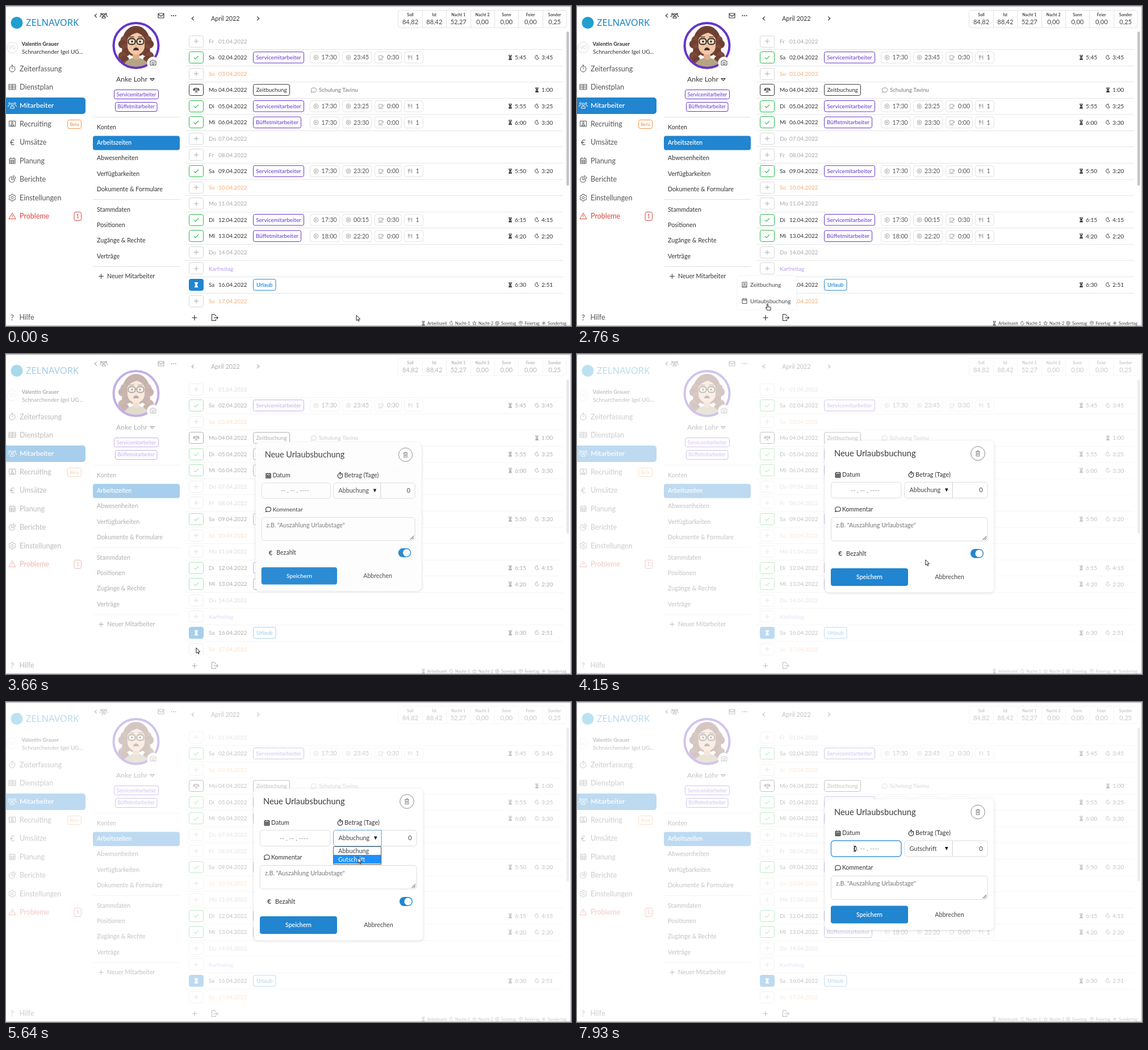
Recreate the animation shown at these times as an HTML page with a canvas. Size 995 px wide and 563 px high, loop 8000 ms.

```html
<!DOCTYPE html>
<html lang="de">
<head>
<meta charset="utf-8">
<title>Urlaubsbuchung</title>
<style>
html, body { margin: 0; width: 100%; height: 100%; overflow: hidden; background: #fff; }
canvas { display: block; }
</style>
</head>
<body>
<canvas id="stage" width="995" height="563"></canvas>
<script>
const W = 995, H = 563, LOOP = 8000;
const stage = document.getElementById('stage').getContext('2d');
const page = document.createElement('canvas');
page.width = W;
page.height = H;
let g = page.getContext('2d');

const BLUE = '#2185d0', PURPLE = '#6435c9', GREEN = '#21ba45', INK = '#333', GREY = '#b4b4b4';

const ICONS = {
  watch: 'M-5 1a5 5 0 1 0 10 0a5 5 0 1 0-10 0M-1.5-6h3M0-6v2M0 1v-3M4-4l1 1',
  table: 'M-6-4.5h12v9h-12zM-6-1.5h12M-6 1.5h12M0-4.5v9',
  users: 'M-2-2a2 2 0 1 0 4 0a2 2 0 1 0-4 0M-3.5 5v-1.5q0-2 2-2h3q2 0 2 2v1.5zM-6.3-3.5a1.5 1.5 0 1 0 3 0a1.5 1.5 0 1 0-3 0M3.3-3.5a1.5 1.5 0 1 0 3 0a1.5 1.5 0 1 0-3 0M-7.5 2.5v-1q0-1.5 1.5-1.5h1.5M7.5 2.5v-1q0-1.5-1.5-1.5h-1.5',
  person: 'M-5.5-5h11v9.5h-11zM-1.5-2a1.5 1.5 0 1 0 3 0a1.5 1.5 0 1 0-3 0M-3 3q0-2.5 3-2.5t3 2.5z',
  calendar: 'M-5-4h10v9h-10zM-5-1h10M-5 2h10M-1.7-1v6M1.7-1v6M-2.5-6v2M2.5-6v2',
  pie: 'M-1-4.5a5 5 0 1 0 5.5 5.5h-5.5zM1.5-6v4.5h4.5a4.5 4.5 0 0 0-4.5-4.5z',
  gear: 'M0-2a2 2 0 1 0 .01 0zM-1.3-6h2.6l.5 1.7 1.2.7 1.8-.5 1.2 2.1-1.2 1.3v1.4l1.2 1.3-1.2 2.1-1.8-.5-1.2.7-.5 1.7h-2.6l-.5-1.7-1.2-.7-1.8.5-1.2-2.1 1.2-1.3v-1.4l-1.2-1.3 1.2-2.1 1.8.5 1.2-.7z',
  warn: 'M0-5.5l6 10.5h-12zM0-2v3.5M0 3v.6',
  mail: 'M-5-4h10v8h-10zM-5-2.5l5 3.5 5-3.5',
  camera: 'M-5-3h2.2l1-1.6h3.6l1 1.6h2.2v7h-10zM-2 .5a2 2 0 1 0 4 0a2 2 0 1 0-4 0',
  glass: 'M-3.5-4.5h7M-3.5 4.5h7M-2.5-4.5q0 3 1.8 4.5q-1.8 1.5-1.8 4.5h5q0-3-1.8-4.5q1.8-1.5 1.8-4.5M-1.8 3.2q1.8-2 3.6 0zM-1.6-2h3.2l-1.6 1.6z',
  moon: 'M1.5-4.5a4.2 4.2 0 1 0 3 6.2a4.5 4.5 0 0 1-3-6.2z',
  play: 'M-4.2 0a4.2 4.2 0 1 0 8.4 0a4.2 4.2 0 1 0-8.4 0M-1.2-1.8l3 1.8-3 1.8z',
  stop: 'M-4.2 0a4.2 4.2 0 1 0 8.4 0a4.2 4.2 0 1 0-8.4 0M-1.4-1.4h2.8v2.8h-2.8z',
  cup: 'M-3.5-3.5h6v4.5q0 1.5-1.5 1.5h-3q-1.5 0-1.5-1.5zM2.5-2.5h1q1.5 0 1.5 1.5t-1.5 1.5h-1M-5 4.5h9',
  fork: 'M-3.5-4v3q0 1.3 1.3 1.3t1.3-1.3v-3M-2.2-4v8.5M3.5 4.5v-8.5q-2.2 1-2.2 4.5h2.2',
  comment: 'M-4.5 0q0-3.8 4.5-3.8t4.5 3.8-4.5 3.8q-1 0-2-.4l-2.5 1 .8-2q-.8-1-.8-2.4z',
  scale: 'M0-4.5v8.5M-3 4h6M-4-3h8M-4-3l-1.8 3.5h3.6zM4-3l-1.8 3.5h3.6z',
  check: 'M-4.5 0l3 3 6-6',
  plus: 'M-4.5 0h9M0-4.5v9',
  left: 'M2-3.8l-4 3.8 4 3.8',
  right: 'M-2-3.8l4 3.8-4 3.8',
  caret: 'M-3.8-2h7.6l-3.8 4z',
  leave: 'M2.5-2.5v-1l-2.3-2.5h-4.7v11h7v-2.5M-1 0h7M4-2.2l2.2 2.2-2.2 2.2',
  star: 'M0-4.5l1.3 3 3.2.3-2.4 2.1.8 3.2-2.9-1.7-2.9 1.7.8-3.2-2.4-2.1 3.2-.3z',
  sun: 'M-4.4 0a4.4 4.4 0 1 0 8.8 0a4.4 4.4 0 1 0-8.8 0M-2 0a2 2 0 1 0 4 0a2 2 0 1 0-4 0',
  pin: 'M0 4.6q-4.2-3.5-4.2-5.4a4.2 3.8 0 0 1 8.4 0q0 1.9-4.2 5.4zM-1.5-1a1.5 1.5 0 1 0 3 0a1.5 1.5 0 1 0-3 0',
  burst: 'M0-4.5v9M-4-2.3l8 4.6M-4 2.3l8-4.6',
  trash: 'M-4-3.5h8M-1.5-3.5v-1.3h3v1.3M-3-3.5v8.5h6v-8.5M-1-1.5v4.5M1-1.5v4.5',
  book: 'M-4-4.5h8v9h-8zM-4 2.5h8M-2-2h4M-2 0h4',
  day: 'M-4-3.5h8v8h-8zM-4-1.5h8M-2-5v1.5M2-5v1.5',
  grip: 'M-3.5 3.5l7-7M0 3.5l3.5-3.5',
  arrow: 'M0 0v9.5l2.2-2 1.5 3.2 1.5-.7-1.5-3.1h3z',
  hand: 'M0 .8q0-.8.9-.8t.9.8v4l4 .9q1 .3.9 1.3l-.6 4h-5.6l-3-4.4q.6-1 1.6-.2l.9.8z',
  beam: 'M-2.2-4.8q2.2 0 2.2 1q0-1 2.2-1M0-3.8v7.6M-2.2 4.8q2.2 0 2.2-1q0 1 2.2 1'
};
for (const k in ICONS) ICONS[k] = new Path2D(ICONS[k]);

function icon(name, x, y, color = INK, size = 1, line = 0.9, fill) {
  g.save();
  g.translate(x, y);
  g.scale(size, size);
  g.lineWidth = line / size;
  g.lineJoin = 'round';
  if (fill) { g.fillStyle = fill; g.fill(ICONS[name]); }
  g.strokeStyle = color;
  g.stroke(ICONS[name]);
  g.restore();
}

// y is the middle of the capital letters
function text(s, x, y, size, color = INK, align = 'left', weight = 400, family = 'Lato') {
  g.font = `${weight} ${size}px ${family}, sans-serif`;
  g.textAlign = align;
  g.fillStyle = color;
  g.fillText(s, x, y + size * 0.36);
}

function box(x, y, w, h, r, stroke, fill, line = 1) {
  g.beginPath();
  g.roundRect(x, y, w, h, r);
  if (fill) { g.fillStyle = fill; g.fill(); }
  if (stroke) { g.strokeStyle = stroke; g.lineWidth = line; g.stroke(); }
}

function disc(x, y, r, fill, stroke, line = 1) {
  g.beginPath();
  g.arc(x, y, r, 0, 7);
  if (fill) { g.fillStyle = fill; g.fill(); }
  if (stroke) { g.strokeStyle = stroke; g.lineWidth = line; g.stroke(); }
}

function rule(x, y, w, h, color) {
  g.fillStyle = color;
  g.fillRect(x, y, w, h);
}

function sidebar() {
  disc(19, 29.5, 10.5, '#1f9fd0');
  text('ZELNAVORK', 35, 29.5, 16.6, '#1a86c0', 'left', 500, '"Noto Sans"');
  disc(11, 73, 9.5, '#fff', '#ddd');
  text('VG', 11, 73, 8.5, '#d5d5d5', 'center');
  text('Valentin Grauer', 27.5, 67, 9.4, INK, 'left', 700);
  text('Schnarchender Igel UG...', 28, 80, 10);
  const items = [['Zeiterfassung', 'watch'], ['Dienstplan', 'table'], ['Mitarbeiter', 'users'],
    ['Recruiting', 'person'], ['Umsätze'], ['Planung', 'calendar'], ['Berichte', 'pie'],
    ['Einstellungen', 'gear'], ['Probleme', 'warn']];
  box(-6, 161, 146, 29, 5, null, BLUE);
  items.forEach(([label, pic], i) => {
    const y = 110 + i * 32.45, on = i === 2;
    const color = on ? '#fff' : i === 8 ? '#d9453d' : '#555';
    if (pic) icon(pic, 11, y, color, 1, 1);
    else text('€', 11, y, 14, color, 'center');
    text(label, 24, y, on ? 12 : 12.5, color, 'left', on ? 600 : 400);
  });
  box(108.5, 200.5, 24, 15, 3, '#f2914a');
  text('Beta', 120.5, 208, 8, '#f2813a', 'center');
  box(120, 362.5, 12.5, 15, 3, '#d9453d');
  text('1', 126.2, 370, 9.5, '#d9453d', 'center');
  text('?', 11, 548, 14, '#555', 'center');
  text('Hilfe', 23.5, 548, 12.4, '#555');
}

function portrait() {
  const x = 229, hair = '#6f4032';
  g.save();
  disc(x, 69.5, 38.5, '#fff');
  g.clip();
  g.beginPath();
  g.ellipse(x, 62, 24, 27, 0, 0, 7);
  g.fillStyle = hair;
  g.fill();
  for (let i = 0; i < 7; i++) for (const s of [-1, 1])
    disc(x + s * (20 + 4 * Math.sin(i * 1.9)), 60 + i * 7, 7.5, i % 2 ? hair : '#7b4a39');
  g.beginPath();
  g.ellipse(x, 112, 24, 21, 0, 0, 7);
  g.fillStyle = '#b5a582';
  g.fill();
  box(x - 6, 80, 12, 15, 6, null, '#dfae8b');
  box(x - 15, 45, 30, 41, 15, null, '#f0c8a6');
  g.beginPath();
  g.moveTo(x - 17, 63);
  g.quadraticCurveTo(x - 13, 50, x + 2, 47);
  g.quadraticCurveTo(x + 14, 51, x + 17, 63);
  g.quadraticCurveTo(x + 20, 38, x, 37);
  g.quadraticCurveTo(x - 20, 38, x - 17, 63);
  g.fillStyle = hair;
  g.fill();
  for (const s of [-1, 1]) {
    box(x + s * 7.5 - 6, 57.5, 12, 10, 4, '#2b2422', '#f6dcc6', 1.8);
    disc(x + s * 7, 62.5, 1.7, '#2b2422');
    rule(x + s * 7.5 - 4, 53.8, 8, 1.4, '#4c2d24');
  }
  rule(x - 2, 61, 4, 1.5, '#2b2422');
  rule(x - 2, 70, 4, 1, '#cf9a78');
  g.beginPath();
  g.arc(x, 78, 5, Math.PI, 0);
  g.fillStyle = '#51282a';
  g.fill();
  g.restore();
  disc(x, 69.5, 39.5, null, PURPLE, 4);
  disc(259, 100, 10.5, '#fff', '#eee', 0.8);
  icon('camera', 259, 100, INK);
}

function staffPanel() {
  icon('left', 158, 17, INK, 0.9, 1.1);
  icon('users', 172, 17, INK, 0.85, 1.2);
  icon('mail', 273, 17, INK, 1, 1.1);
  for (let i = 0; i < 3; i++) disc(291.5 + i * 3.6, 17, 1.1, INK);
  portrait();
  text('Anke Lohr', 194, 129, 12.3);
  icon('caret', 257.5, 129.5, INK, 0.95, 1.1);
  box(190.5, 147.5, 78, 16, 3, PURPLE);
  text('Servicemitarbeiter', 229.5, 155.5, 8.65, PURPLE, 'center');
  box(192.5, 169.5, 73.5, 16, 3, PURPLE);
  text('Büffetmitarbeiter', 229.3, 177.3, 8.65, PURPLE, 'center');
  for (const y of [195, 340, 458]) rule(153, y, 153, 1, '#dedede');
  box(153, 228.5, 153, 25, 4, null, BLUE);
  ['Konten', 'Arbeitszeiten', 'Abwesenheiten', 'Verfügbarkeiten', 'Dokumente & Formulare'].forEach((s, i) =>
    text(s, 160, 213 + i * 27.3, i === 1 ? 10.4 : 10.7, i === 1 ? '#fff' : INK, 'left', i === 1 ? 600 : 400));
  ['Stammdaten', 'Positionen', 'Zugänge & Rechte', 'Verträge'].forEach((s, i) =>
    text(s, 160, 358 + i * 27.3, 10.7));
  icon('plus', 167.5, 475.5, INK, 0.95, 1);
  text('Neuer Mitarbeiter', 178, 475.5, 10.6);
}

function summary() {
  icon('left', 329, 22, INK, 0.9, 1.2);
  text('April 2022', 361, 22, 10.9);
  icon('right', 444, 22, INK, 0.9, 1.2);
  box(690.5, 7.5, 296.5, 30.5, 4, '#e2e2e2');
  const cells = ['Soll 84,82', 'Ist 88,42', 'Nacht_1 52,27', 'Nacht_2 0,00', 'Sonn 0,00', 'Feier 0,00', 'Sonder 0,25'];
  cells.forEach((c, i) => {
    const [head, value] = c.split(' '), x = 712 + i * 42.35;
    text(head.replace('_', ' '), x, 15, 7.2, INK, 'center', 600);
    text(value, x, 28, 11, '#444', 'center');
    if (i) rule(Math.round(x - 21.5), 8, 1, 30, '#e2e2e2');
  });
}

// kind, day, date or label, start, end, break, hours, night
const ROWS = [
  'free Fr 01', 'S Sa 02 17:30 23:45 0:30 5:45 3:45', 'sun So 03', 'book Mo 04',
  'S Di 05 17:30 23:25 0:00 5:55 3:25', 'B Mi 06 17:30 23:30 0:00 6:00 3:30',
  'free Do 07', 'free Fr 08', 'S Sa 09 17:30 23:20 0:00 5:50 3:20', 'sun So 10', 'free Mo 11',
  'S Di 12 17:30 00:15 0:30 6:15 4:15', 'B Mi 13 18:00 22:20 0:00 4:20 2:20',
  'free Do 14', 'feast', 'leave Sa 16', 'sun So 17'];

function tag(s, y, w, color, weight = 400) {
  box(435.5, y - 9.8, w, 19.5, 3, color);
  text(s, 435.5 + w / 2, y, weight > 400 ? 9.6 : 9.9, color, 'center', weight);
}

function totals(y, hours, night) {
  icon('glass', 888, y, INK, 0.85, 1);
  text(hours, 896, y, 10.2);
  icon('moon', 934.5, y, INK, 0.85);
  text(night, 943, y, 10.2);
}

function dayRow(row, i) {
  const [kind, day, date, from, to, rest, hours, night] = row.split(' ');
  const y = 62 + i * 28.57, top = Math.round(y - 10.5) + 0.5;
  const work = kind === 'S' || kind === 'B';
  const color = { free: '#a8a8a8', sun: '#f7ac74', feast: '#b79df0' }[kind] || INK;
  if (i < 16) rule(316, Math.round(y + 14), 665, 1, '#e6e6e6');
  const edge = work ? GREEN : kind === 'book' ? INK : kind === 'leave' ? BLUE : '#d6d6d6';
  box(322.5, top, 25, 20, 3, edge, kind === 'leave' ? BLUE : null);
  const pic = work ? 'check' : { book: 'scale', leave: 'glass' }[kind] || 'plus';
  icon(pic, 335, y, work ? GREEN : kind === 'book' ? INK : kind === 'leave' ? '#fff' : GREY, 0.9, 1.1, kind === 'leave' && '#fff');
  if (kind === 'feast') return text('Karfreitag', 357, y, 9.9, color);
  text(day, 357, y, 9.9, color);
  text(date + '.04.2022', 374, y, 9.9, color);
  if (kind === 'book') {
    tag('Zeitbuchung', y, 64, INK);
    icon('comment', 542, y, '#888', 1);
    text('Schulung Tavinu', 551, y, 9.7, '#777');
    icon('glass', 935, y, INK, 0.85, 1);
    text('1:00', 943, y, 10.2);
  }
  if (kind === 'leave') {
    tag('Urlaub', y, 39.5, BLUE, 600);
    totals(y, '6:30', '2:51');
  }
  if (!work) return;
  if (kind === 'S') tag('Servicemitarbeiter', y, 89, PURPLE);
  else tag('Büffetmitarbeiter', y, 84, PURPLE);
  const chips = [[535.5, 51.5, 546, 'play', from, 555.5], [592.5, 51.5, 603, 'stop', to, 612],
    [649.5, 47, 660, 'cup', rest, 671], [701.5, 33, 711.5, 'fork', '1', 721.5]];
  for (const [x, w, ix, name, label, tx] of chips) {
    box(x, y - 9.7, w, 19.5, 4, '#e2e2e2');
    icon(name, ix, y, '#999', 0.95, 0.85);
    text(label, tx, y, 10.6, '#555');
  }
  totals(y, hours, night);
}

function footer() {
  icon('plus', 332, 548.5, INK, 1, 1.2);
  icon('leave', 367, 548.5, INK, 1, 1.1);
  const legend = [['glass', 735, 'Arbeitszeit'], ['moon', 784, 'Nacht-1'], ['star', 825, 'Nacht-2'],
    ['sun', 865, 'Sonntag'], ['pin', 906.5, 'Feiertag'], ['burst', 947, 'Sondertag']];
  for (const [name, x, label] of legend) {
    icon(name, x, 558, '#555', 0.75, 0.75);
    text(label, x + 7, 558, 7.35, '#444');
  }
}

function drawPage() {
  rule(0, 0, W, H, '#fff');
  sidebar();
  staffPanel();
  summary();
  ROWS.forEach(dayRow);
  box(987, 45, 4.5, 271, 2, null, '#c4c4c4');
  footer();
}

const clamp = v => Math.min(1, Math.max(0, v));
const ramp = (t, from, to) => clamp((t - from) / (to - from));
const EASE = {
  both: p => p * p * (3 - 2 * p),
  in: p => p * p,
  out: p => 1 - (1 - p) * (1 - p)
};

// time, x, y, easing of the way there
const PATH = [[650, 617, 544], [1440, 332, 552, 'both'], [2520, 333, 552, 'both'], [2860, 335, 517, 'both'],
  [3850, 335, 517, 'both'], [4100, 480, 381, 'in'], [4400, 910, 320, 'out'], [4690, 632, 246, 'both'],
  [5360, 632, 246, 'both'], [5640, 620, 274, 'both'], [6310, 620, 274, 'both'], [6690, 486, 269, 'both'],
  [7020, 486, 269, 'both'], [7080, 489, 258, 'both']];

function pointerAt(t) {
  let a = PATH[0];
  if (t <= a[0]) return [a[1], a[2]];
  for (const b of PATH) {
    if (t < b[0]) {
      const p = EASE[b[3]](ramp(t, a[0], b[0]));
      return [a[1] + (b[1] - a[1]) * p, a[2] + (b[2] - a[2]) * p];
    }
    a = b;
  }
  return [a[1], a[2]];
}

function pointer(t) {
  const [x, y] = pointerAt(t);
  if (t >= 6600) return icon('beam', x, y, '#111', 1, 1.1);
  const hand = (t >= 1490 && t < 3340) || (t >= 4600 && t < 4900);
  icon(hand ? 'hand' : 'arrow', x, y, '#111', 1, 0.9, '#fff');
}

function menu(t) {
  const a = ramp(t, 2100, 2360) * (1 - ramp(t, 3340, 3620));
  if (!a) return;
  const dy = 7 * (a - 1);
  g.save();
  g.globalAlpha = a;
  g.shadowColor = 'rgba(0,0,0,.1)';
  g.shadowBlur = 3;
  box(283, 475 + dy, 103, 59, 3, null, '#fff');
  g.shadowColor = 'transparent';
  icon('book', 295, 490.5 + dy, '#444');
  text('Zeitbuchung', 305, 490.5 + dy, 9.9, '#444');
  icon('day', 295, 519 + dy, '#444');
  text('Urlaubsbuchung', 305, 519 + dy, 10, '#444');
  g.restore();
}

function dropdown(t) {
  const second = t >= 5500;
  box(577.5, 255.5, 84, 31, 0, null, 'rgba(0,0,0,.25)');
  box(576.5, 254.5, 84, 31, 0, '#666', '#fff');
  rule(577, second ? 269 : 255, 83, 15, '#1e90ff');
  text('Abbuchung', 585, 262, 10.8, second ? '#444' : '#fff');
  text('Gutschrift', 585, 276.8, 10.8, second ? '#fff' : '#444');
}

function dialog(t, e) {
  const credit = t >= 6070, d = credit ? 18.5 : 0, s = 0.85 + 0.15 * e;
  const line = '#dcdcdc', dark = '#3a3a3a';
  g.save();
  g.globalAlpha = EASE.both(e);
  g.translate(585.5, 286);
  g.scale(s, s);
  g.translate(-585.5, -286);
  g.shadowColor = 'rgba(0,0,0,.14)';
  g.shadowBlur = 5;
  g.shadowOffsetY = 1;
  box(436.5, 152.5 + d, 298, 267 - 2 * d, 8, null, '#fff');
  g.shadowColor = 'transparent';

  g.save();
  g.translate(0, d);
  text('Neue Urlaubsbuchung', 453, 175, 14.7, dark);
  disc(706, 175, 12.3, null, '#8a8a8a');
  icon('trash', 706, 175, '#777', 0.95);
  icon('calendar', 459.5, 212.5, INK, 0.85, 1.3);
  text('Datum', 467, 212, 10.7);
  icon('watch', 588.5, 212, INK, 0.85, 1.3);
  text('Betrag (Tage)', 596, 212, 10.9);

  const dateOn = t >= 7270;
  box(447.5, 225.5, 123.5, 28, 5, dateOn ? '#3d96d8' : line, null, dateOn ? 1.4 : 1);
  if (t >= 7800) text('0', 487, 239.5, 10.7, INK);
  else text('--', 482, 239.5, 11.5, '#999');
  text('.', 493, 239.5, 11.5, '#777');
  text('--', 498.5, 239.5, 11.5, '#999');
  text('.', 510, 239.5, 11.5, '#777');
  text('----', 515.5, 239.5, 11.5, '#999');

  box(661.5, 225.5, 61.5, 28, [0, 5, 5, 0], line);
  box(576.5, 225.5, 84.5, 28, [5, 0, 0, 5], t >= 4910 && !dateOn ? '#5ea6da' : line);
  text(credit ? 'Gutschrift' : 'Abbuchung', 585.5, 239.5, 10.9, '#444');
  g.beginPath();
  g.moveTo(648, 236.5);
  g.lineTo(653.6, 236.5);
  g.lineTo(650.8, 242.5);
  g.fillStyle = '#111';
  g.fill();
  text('0', 714.5, 239.5, 10.9, '#444', 'right');

  icon('comment', 459.5, 273, INK, 1.05, 1.1);
  text('Kommentar', 467, 273, 10.6);
  box(447.5, 287.5, 275.5, 41.5, 5, line);
  text('z.B. "Auszahlung Urlaubstage"', 456, 301, 10.8, '#777');
  icon('grip', 717.8, 323.8, INK, 0.95, 1);
  g.restore();

  if (!credit) {
    text('€', 463.5, 351, 11.5, INK, 'center', 600);
    text('Bezahlt', 474, 351, 10.8);
    box(693, 343, 23, 16, 8, null, BLUE);
    disc(708, 351, 6.6, '#fff');
  }
  box(447, 377 - d, 136, 31, 4, null, BLUE);
  text('Speichern', 515, 392.5 - d, 10.5, '#fff', 'center', 600);
  text('Abbrechen', 656, 392.5 - d, 10.8, '#444', 'center');
  if (t >= 4910 && !credit) dropdown(t);
  g.restore();
}

function render(t) {
  g.drawImage(page, 0, 0);
  const hover = ramp(t, 1480, 1700) * (1 - ramp(t, 2520, 2680));
  if (hover) {
    g.globalAlpha = hover;
    box(317, 535, 30, 27.5, 4, null, '#efefef');
    g.globalAlpha = 1;
    icon('plus', 332, 548.5, INK, 1, 1.2);
  }
  menu(t);
  const e = EASE.out(ramp(t, 3465, 3775));
  if (e) {
    rule(0, 0, W, H, `rgba(255,255,255,${0.7 * e})`);
    dialog(t, e);
  }
  rule(0, 0, W, 1.5, '#bdbdbd');
  rule(0, H - 1, W, 1, '#b4b4b4');
  rule(W - 1, 0, 1, H, '#b4b4b4');
  pointer(t);
}

drawPage();
g = stage;
const start = performance.now();
function tick() {
  render((performance.now() - start) % LOOP);
  requestAnimationFrame(tick);
}
tick();
</script>
</body>
</html>
```
